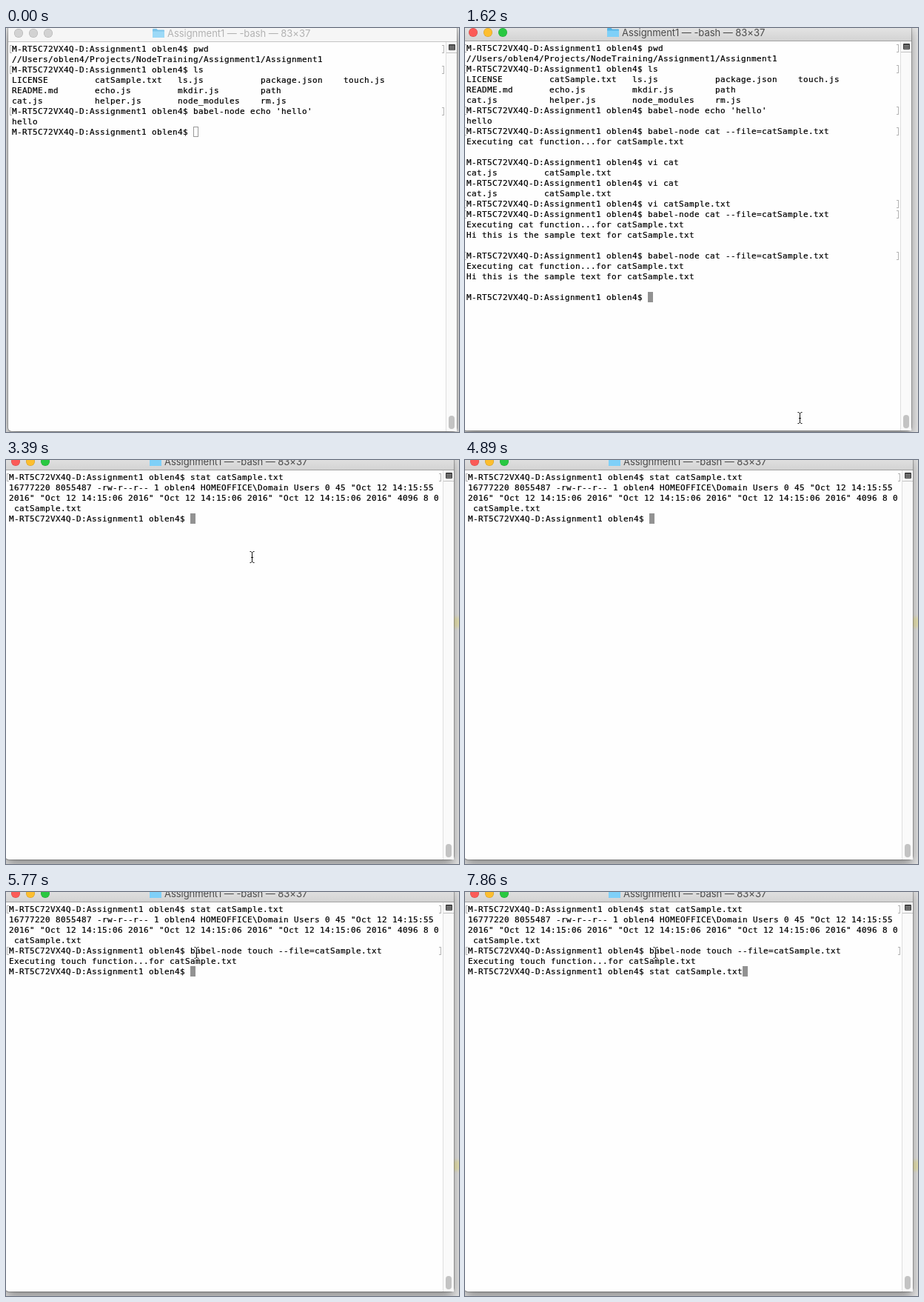
Animation, 612 px wide and 545 px high, one loop 8 s. Source, as an HTML page:

```html
<!DOCTYPE html>
<html lang="en">
<head>
<meta charset="utf-8">
<title>Terminal session</title>
<style>
html, body { margin: 0; width: 100%; height: 100%; overflow: hidden; }
body { position: relative; background: #e8e8e8; }
#stage { position: absolute; left: 0; top: 0; width: 612px; height: 545px; overflow: hidden; }
#stage div, #stage svg { position: absolute; }
#glow { left: 603px; width: 14px; height: 14px; background: #efe9b8; filter: blur(2px); }

/* The window's own origin lies at the stage corner; scenes shift it. */
#win { left: 0; top: 0; width: 612px; height: 545px; }
#frame {
  left: -1px; top: -9px; width: 606px; height: 548px; border-radius: 5px; background: #fefefe;
  box-shadow: 0 0 0 1px #0000003d, 0 7px 16px #0000006b;
}
#bar {
  left: -1px; top: -9px; width: 606px; height: 22px; border-radius: 5px 5px 0 0;
  background: linear-gradient(#e8e8e8, #d3d3d3); border-bottom: 1px solid #a2a2a2;
}
.light { top: 5px; width: 12px; height: 12px; border-radius: 50%; box-shadow: inset 0 0 0 .5px #0003; }
.light:nth-child(1) { left: 8px; background: #fc5b57; }
.light:nth-child(2) { left: 28px; background: #fdbe2f; }
.light:nth-child(3) { left: 48px; background: #29c841; }
#dot { left: 4px; top: 4px; width: 4px; height: 4px; border-radius: 50%; background: #5c0705; }
#folder { top: 4px; }
#title {
  top: 3px; height: 16px; white-space: pre; color: #4a4a4a; letter-spacing: -.04px;
  font: 13px/16px Inter, "DejaVu Sans", sans-serif;
}
.busy #title { letter-spacing: -.27px; }
.busy #folder { opacity: .6; }
.idle #bar { background: #f6f6f6; border-color: #c4c4c4; }
.idle .light { background: #d2d2d2; }
.idle #title { color: #b2b2b2; }
.idle #folder { opacity: .75; }

#track { left: 590px; top: 14px; width: 14px; height: 525px; background: #fafafa; border-left: 1px solid #dedede; }
#corner { left: 0; top: 0; width: 14px; height: 14px; border-bottom: 1px solid #c4c4c4; }
#thumb { left: 3px; top: 504px; width: 8px; height: 18px; border-radius: 4px; background: #c3c3c3; }

#screen {
  left: 4px; top: 17px; width: 585px; color: #000; white-space: pre; -webkit-text-stroke: .22px #000;
  font: 11px/14px "DejaVu Sans Mono", monospace; letter-spacing: calc(7px - .60205em);
}
#screen p { position: relative; margin: 0; height: 14px; }
.mark::before, .mark::after {
  content: ""; position: absolute; top: 1px; width: 2px; height: 9px; border: 1px solid #b4b4b4;
}
.mark::before { left: -3px; border-right: 0; }
.mark::after { left: 581px; border-left: 0; }
#caret {
  display: inline-block; position: relative; top: -1px; box-sizing: border-box;
  width: 7px; height: 14px; background: #929292; vertical-align: top;
}
.idle #caret { background: none; border: 1px solid #999; }
</style>
</head>
<body>
<div id="stage">
  <div id="glow"></div>
  <div id="win">
    <div id="frame"></div>
    <div id="bar">
      <div class="light"><div id="dot"></div></div>
      <div class="light"></div>
      <div class="light"></div>
      <svg id="folder" width="16" height="14">
        <path d="M0 2Q0 1 1 1H5.5L7 2.5H15Q16 2.5 16 3.5V12Q16 13 15 13H1Q0 13 0 12Z" fill="#54b4e6"/>
        <path d="M0 4.5H16V12Q16 13 15 13H1Q0 13 0 12Z" fill="#7fd0f8"/>
      </svg>
      <div id="title"></div>
    </div>
    <div id="track">
      <div id="corner">
        <svg width="14" height="14">
          <rect x="3" y="3" width="9" height="8" rx="1" fill="#3c3c3c"/>
          <path d="M4 5.5H11M4 7.5H11M4 9.5H11" stroke="#b0b0b0" stroke-width=".8"/>
        </svg>
      </div>
      <div id="thumb"></div>
    </div>
    <div id="screen"></div>
  </div>
  <svg id="pointer" width="7" height="16" overflow="visible" fill="none">
    <defs>
      <path id="beam" d="M.5 .5H2L3.5 2 5 .5H6.5M3.5 2V14M.5 15.5H2L3.5 14 5 15.5H6.5M2 8.5H5"/>
    </defs>
    <use href="#beam" stroke="#fff" stroke-width="2.4"/>
    <use href="#beam" stroke="#111"/>
  </svg>
</div>
<script>
const LOOP = 8000;
const PROMPT = 'M-RT5C72VX4Q-D:Assignment1 oblen4$ ';
const $ = id => document.getElementById(id);

// Lines starting with "[" are entered prompts with margin marks, "$" are plain prompts.
const intro = `[pwd
//Users/oblen4/Projects/NodeTraining/Assignment1/Assignment1
[ls
LICENSE         catSample.txt   ls.js           package.json    touch.js
README.md       echo.js         mkdir.js        path
cat.js          helper.js       node_modules    rm.js
[babel-node echo 'hello'
hello
`;
const catCmd = '[babel-node cat --file=catSample.txt\nExecuting cat function...for catSample.txt\n';
const catRun = catCmd + 'Hi this is the sample text for catSample.txt\n\n';
const viList = '$vi cat\ncat.js         catSample.txt\n';
const catLog = intro + catCmd + '\n' + viList + viList + '[vi catSample.txt\n' + catRun + catRun + '$';

const stat = 'stat catSample.txt';
const touch = 'babel-node touch --file=catSample.txt';
const date = ' "Oct 12 14:15:06 2016"';
const statLog = `[${stat}
16777220 8055487 -rw-r--r-- 1 oblen4 HOMEOFFICE\\Domain Users 0 45 "Oct 12 14:15:55
2016"${date.repeat(3)} 4096 8 0
 catSample.txt
`;
const touchLog = statLog + `[${touch}\n`;
const doneLog = touchLog + 'Executing touch function...for catSample.txt\n$';

const shell = 'Assignment1 — -bash — 83×37';
const node = args => `Assignment1 — node ◂ node ~/.nvm/versions/node/v6.7.0/bin/babel-node ${args}…`;

// Each step changes part of the state at its start time.
const steps = [
  [0, { shift: [4, 5], idle: true, title: shell, text: intro + '$', pointer: null, glow: -40 }],
  [270, { shift: [-2, 4], idle: false, title: node('cat --file='), text: catLog, pointer: [276, 298] }],
  [420, { title: shell }],
  [1470, { pointer: [385, 491] }],
  [1620, { pointer: [449, 518] }],
  [1760, { pointer: null }],
  [2040, { shift: [0, 0], text: '$clear', pointer: [329, 123], glow: 212 }],
  [2790, { text: '$' + stat }],
  [3240, { text: `[${stat}\n` }],
  [3390, { text: statLog + '$' }],
  [4290, { pointer: [338, 124] }],
  [4440, { pointer: [463, 446] }],
  [4590, { pointer: [530, 501] }],
  [4740, { pointer: [528, 526] }],
  [4890, { pointer: null }],
  [5190, { text: statLog + '$' + touch, pointer: [254, 74], glow: 362 }],
  [5320, { title: node('touch --fil'), text: touchLog }],
  [5620, { text: doneLog }],
  [5770, { title: shell }],
  [6670, { text: doneLog + touch }],
  [6960, { text: doneLog + stat }],
  [7260, { text: doneLog + 'clear' }],
  [7860, { text: doneLog + stat }]
];

function drawText(text) {
  const rows = text.split('\n').map(line => {
    const row = document.createElement('p');
    const entered = line[0] === '[';
    row.textContent = entered || line[0] === '$' ? PROMPT + line.slice(1) : line;
    row.classList.toggle('mark', entered);
    return row;
  });
  const caret = document.createElement('span');
  caret.id = 'caret';
  rows[rows.length - 1].append(caret);
  $('screen').replaceChildren(...rows);
}

function draw(s) {
  const busy = s.title !== shell;
  const left = busy ? 67 : 195;
  $('win').style.transform = `translate(${s.shift[0]}px, ${s.shift[1]}px)`;
  $('win').className = s.idle ? 'idle' : busy ? 'busy' : '';
  $('dot').hidden = !busy;
  $('folder').style.left = left + 'px';
  $('title').style.left = left + 20 + 'px';
  $('title').textContent = s.title;
  $('glow').style.top = s.glow + 'px';
  const [x, y] = s.pointer || [-20, -20];
  $('pointer').style.transform = `translate(${x}px, ${y}px)`;
  drawText(s.text);
}

let shown = 0;
function tick() {
  const t = performance.now() % LOOP;
  const count = steps.filter(([start]) => start <= t).length;
  if (count !== shown) {
    shown = count;
    draw(Object.assign({}, ...steps.slice(0, count).map(step => step[1])));
  }
  requestAnimationFrame(tick);
}
tick();
</script>
</body>
</html>
```
